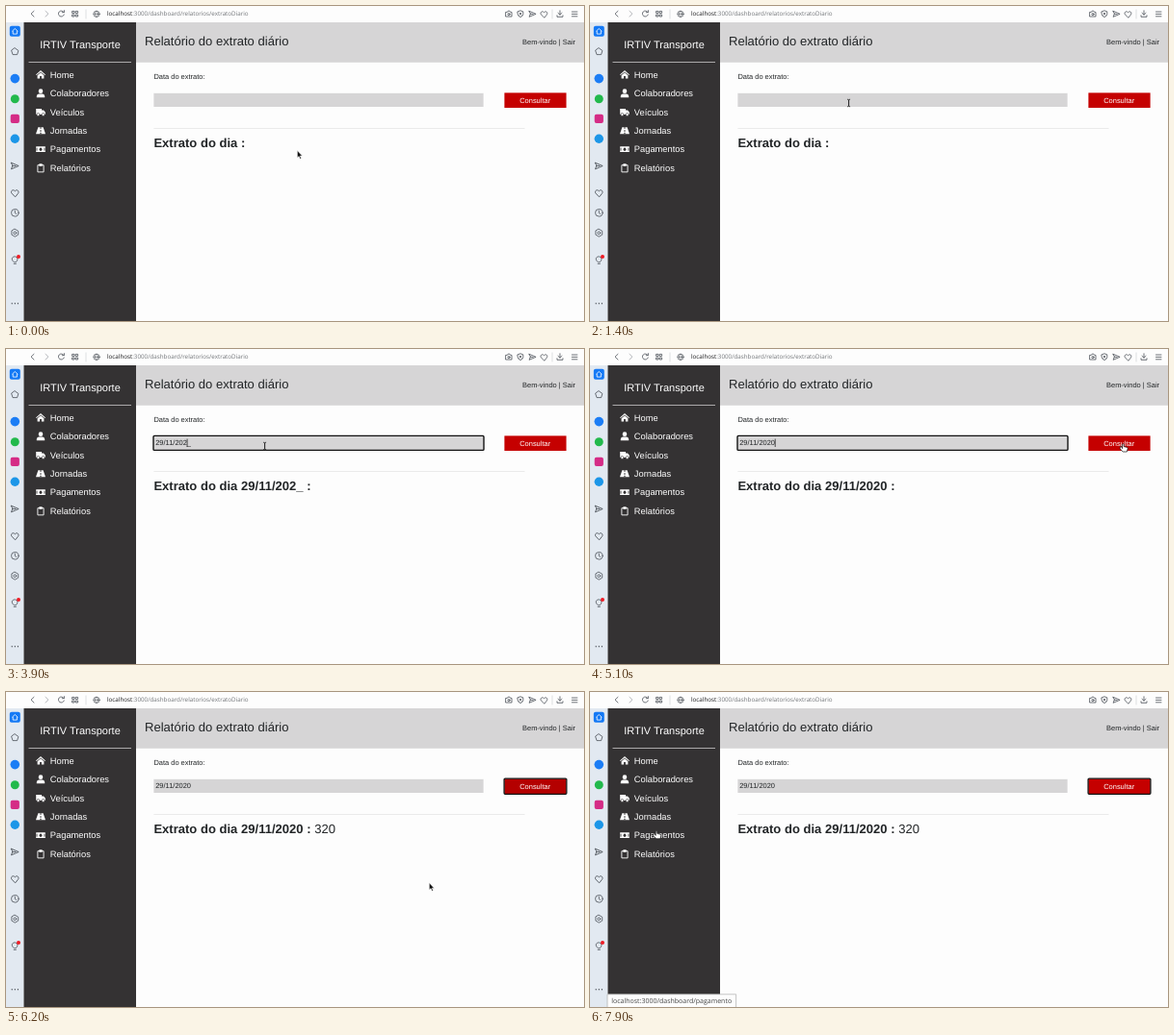
An HTML page that plays this animation: 600 px wide and 328 px high, repeating every 8000 ms.

```html
<!DOCTYPE html>
<html lang="pt">
<head>
<meta charset="utf-8">
<style>
  html, body { margin: 0; overflow: hidden; background: #fdfdfd; }
  svg { display: block; }
  text { font: 7.47px "Liberation Sans", Arial, sans-serif; fill: #222527; text-rendering: geometricPrecision; }
  .brand { font-size: 11px; fill: #fff; text-anchor: middle; }
  .title { font-size: 13.05px; }
  .menu text { font-size: 9.33px; fill: #fff; }
  .url { font: 6.25px "Open Sans", "Noto Sans", sans-serif; fill: #73767a; }
  .url tspan { fill: #1c1c1e; }
  .line { fill: none; stroke: #4b5057; stroke-width: .8; stroke-linecap: round; stroke-linejoin: round; }
  .bold { font-weight: bold; }
</style>
</head>
<body>
<svg width="600" height="328" viewBox="0 0 600 328">
  <defs>
    <path id="heart" d="M0 3.4L-3 .3C-4.6-1.6-1.9-4.3 0-1.8C1.9-4.3 4.6-1.6 3 .3Z"/>
    <path id="plane" d="M-3.4-3L3.6 0L-3.4 3L-2.2 0ZM-2.2 0H.6"/>
    <path id="house" d="M-5 0L0-4.4L5 0L4.3 .7L0-3L-4.3 .7ZM-3.4 .8L0-2.1L3.4 .8V4.2H.9V1.6H-.9V4.2H-3.4Z"/>
  </defs>

  <!-- browser toolbar -->
  <path fill="#fdfdfd" d="M0 0H600V17H0Z"/>
  <g class="line">
    <path d="M29 5.3L26 8.2L29 11.1"/>
    <path stroke="#a5a8ad" d="M41 5.3L44 8.2L41 11.1"/>
    <path d="M60 6.4A3 3 0 1 0 60.3 9M60.4 4.6V6.7H58.3"/>
    <path d="M69 5.4h2v2h-2zM72.6 5.4h2v2h-2zM69 9h2v2h-2zM72.6 9h2v2h-2z"/>
    <path stroke="#d5d7da" d="M83 4V13M567 4V13"/>
    <g stroke-width=".6"><circle cx="94" cy="8.3" r="3.2"/><ellipse cx="94" cy="8.3" rx="1.4" ry="3.2"/><path d="M90.8 8.3H97.2"/></g>
    <path d="M519 6.4h1.4l.7-1.2h1.8l.7 1.2H525V11h-6z"/><circle cx="522" cy="8.6" r="1.1"/>
    <path d="M531.2 5.8L534 4.8L536.8 5.8V8.6Q536.6 10.6 534 11.6Q531.4 10.6 531.2 8.6ZM533 7.1L535 9.1M535 7.1L533 9.1"/>
    <use href="#plane" x="546.5" y="8.3"/>
    <use href="#heart" x="558.5" y="8.6"/>
    <path d="M575 4.8V9M573 7.3L575 9.2L577 7.3M572 9.8V11.3H578V9.8"/>
    <path d="M587.5 6H593M587.5 8.4H593M587.5 10.8H593"/>
  </g>
  <text class="url" x="105" y="10.4"><tspan>localhost</tspan>:3000/dashboard/relatorios/extratoDiario</text>

  <!-- browser sidebar -->
  <path fill="#e2e9f1" d="M0 17H18.5V328H0Z"/>
  <rect x="3.8" y="20.8" width="11" height="11" rx="2" fill="#1479f5"/>
  <path d="M6.3 26.3L9.3 23.5L12.3 26.3M7.2 26V29.1H11.4V26" fill="none" stroke="#fff" stroke-width=".8"/>
  <circle cx="9.3" cy="75.6" r="4.8" fill="#1b7df5"/>
  <circle cx="9.3" cy="96.8" r="4.5" fill="#22b94c"/>
  <rect x="4.7" y="112.8" width="9.2" height="9.2" rx="2" fill="#d52c86"/>
  <circle cx="9.3" cy="138.2" r="4.7" fill="#1c96e8"/>
  <g class="line">
    <path d="M9.3 43.8L12.9 46.5L11.6 50.6H7L5.7 46.5Z"/>
    <use href="#plane" transform="translate(9.2 166.5) scale(1.1)"/>
    <use href="#heart" transform="translate(9.3 194.8) scale(1.1)"/>
    <circle cx="9.3" cy="215.3" r="3.8"/><path d="M9.3 213V215.5L10.8 216.5"/>
    <path d="M9.3 232.3L12.7 234.3V238.2L9.3 240.2L5.9 238.2V234.3Z"/><circle cx="9.3" cy="236.3" r="1.4"/>
    <path d="M8 266.5Q5.8 264.8 6.2 262.8Q7 260.8 9.3 260.8Q11.6 261.2 12 263.4Q12 265.2 10.6 266.5ZM8.2 268.4H10.4"/>
  </g>
  <circle cx="13" cy="261" r="2" fill="#ef1c25"/>
  <path d="M6.2 309.8h.01M9.3 309.8h.01M12.4 309.8h.01" stroke="#4b5057" stroke-width="1.4" stroke-linecap="round"/>

  <!-- app menu -->
  <path fill="#343233" d="M18.5 17H135V328H18.5Z"/>
  <path stroke="#c9c8c9" stroke-width=".8" d="M23.5 58.5H130"/>
  <text class="brand" x="77" y="44.1">IRTIV Transporte</text>
  <g class="menu" id="menu" fill="#fff"></g>

  <!-- page -->
  <path fill="#d6d5d6" d="M135 17H600V58.8H135Z"/>
  <text class="title" x="144" y="41">Relatório do extrato diário</text>
  <text x="536" y="40.4">Bem-vindo | Sair</text>
  <text x="153.4" y="75.8">Data do extrato:</text>
  <rect id="field" x="153.4" y="90.8" width="342.2" height="14.2" fill="#d6d5d6"/>
  <rect id="fieldRing" x="153" y="90.4" width="343" height="15" rx="1" fill="none" stroke="#101010" stroke-width="1.4"/>
  <text id="date" x="155.2" y="100.4"></text>
  <path id="caret" stroke="#111" stroke-width=".7" d="M0 93.6V102"/>
  <rect id="button" x="517.4" y="90.4" width="64.2" height="15.6"/>
  <rect id="buttonRing" x="517.1" y="90.1" width="64.8" height="16.2" rx="1" fill="none" stroke="#101010" stroke-width="1.3"/>
  <text x="533.2" y="100.8" style="fill:#fff">Consultar</text>
  <path stroke="#e6e6e6" stroke-width=".8" d="M153.4 127.5H538.5"/>
  <text class="title" x="153.4" y="147.4"><tspan class="bold" id="heading"></tspan><tspan id="total"></tspan></text>

  <g id="status">
    <path fill="#fdfdfd" stroke="#b5b5b5" stroke-width=".8" d="M18 314.8H151.6V329H18Z"/>
    <text x="22.2" y="323.8" class="url" style="font-size:7px;fill:#444">localhost:3000/dashboard/pagamento</text>
  </g>

  <g id="arrow"><path fill="#111" stroke="#fff" stroke-width=".5" d="M0 0V7.4L1.7 5.9L2.9 8.7L4.1 8.2L2.9 5.5H5.1Z"/></g>
  <g id="beam"><path fill="none" stroke="#222" stroke-width=".8" d="M-1.5-3.8Q0-3.8 0-3V3Q0 3.8-1.5 3.8M1.5-3.8Q0-3.8 0-3V3Q0 3.8 1.5 3.8"/></g>
  <g id="hand"><path fill="#fff" stroke="#111" stroke-width=".7" stroke-linejoin="round" d="M-.8 5V.6Q0-.5 .8 .6V3L4.2 3.8Q5 4 4.8 5L4 8.4H-.3L-3.2 5.2Q-3-.0-.8 5Z"/></g>
</svg>
<script>
const el = id => document.getElementById(id);
const show = (id, on) => el(id).style.display = on ? "" : "none";

const menu = [
  ["Home", '<use href="#house"/>'],
  ["Colaboradores", '<circle cy="-2.2" r="2.3"/><path d="M-4.2 4.4V3Q-3.8 .7-1.6 .7H1.6Q3.8 .7 4.2 3V4.4Z"/>'],
  ["Veículos", '<path d="M-4.8-3.4H1V-1.8H3L4.8 .2V2.6H-4.8Z"/><g stroke="#343233" stroke-width=".6"><circle cx="-2.6" cy="2.7" r="1.5"/><circle cx="2.6" cy="2.7" r="1.5"/></g>'],
  ["Jornadas", '<path d="M-2.6-3.5H2.6L5 3.5H-5Z"/><path stroke="#343233" stroke-width="1.2" d="M0-3.6V-1.9M0-.6V1.1M0 2.1V3.6"/>'],
  ["Pagamentos", '<rect x="-4.9" y="-2.9" width="9.8" height="5.8" rx=".5"/><ellipse rx="1.4" ry="1.8" fill="#343233"/><path stroke="#343233" stroke-width=".9" d="M-4-1.5V1.5M4-1.5V1.5"/>'],
  ["Relatórios", '<path fill="none" stroke="#fff" stroke-width=".9" d="M-3.1-3H3.1V4.2H-3.1Z"/><path d="M-1.6-4.4H1.6V-1.9H-1.6Z"/>']
];
el("menu").innerHTML = menu.map(([label, icon], i) =>
  `<g transform="translate(36 ${71.4 + i * 19.45})">${icon}<text x="9.8" y="3.2">${label}</text></g>`).join("");

const LOOP = 8000, FOCUS = 1900, CLICK = 5400, RESULT = 5600;
const MASK = "__/__/____";
const typing = [
  [FOCUS, ""], [2500, "2"], [2600, "29/"], [3000, "29/1"], [3100, "29/11/"],
  [3500, "29/11/2"], [3700, "29/11/20"], [3800, "29/11/202"], [4000, "29/11/2020"]
];
// time, x, y of the pointer
const path = [
  [0, 302.4, 150.6], [400, 298, 143], [900, 281, 117], [1400, 268.6, 101], [4300, 268.6, 101],
  [4500, 310, 104], [4900, 515, 103], [5100, 553.4, 98.6], [5500, 553, 100], [5800, 550, 106],
  [5900, 534, 148], [6000, 504, 198], [6100, 466, 200], [6400, 386, 196], [7200, 386, 196],
  [7300, 331, 188.6], [7600, 142, 157], [7700, 97, 150], [7800, 74, 145.5], [7900, 69, 144.4]
];

const ramp = (t, from, to) => Math.min(1, Math.max(0, (t - from) / (to - from)));

function pointerAt(t) {
  const i = Math.max(1, path.findIndex(p => p[0] >= t));
  const [a, b] = [path[i - 1], path[i]];
  const k = ramp(t, a[0], b[0]);
  return [a[1] + (b[1] - a[1]) * k, a[2] + (b[2] - a[2]) * k];
}

function draw(t) {
  const [x, y] = pointerAt(t);
  const overField = x > 153 && x < 496 && y > 90 && y < 106;
  const overButton = x > 517 && y > 90 && y < 107;
  const overLink = x < 105;
  const kind = overField ? "beam" : overButton || overLink ? "hand" : "arrow";
  for (const id of ["arrow", "beam", "hand"]) show(id, id === kind);
  el(kind).setAttribute("transform", `translate(${x} ${y})`);
  show("status", overLink);

  const [since, typed] = typing.filter(k => k[0] <= t).pop() || [0, ""];
  const value = t < FOCUS ? "" : typed + MASK.slice(typed.length);
  const focused = t >= FOCUS && t < CLICK;
  el("date").textContent = value;
  el("heading").textContent = `Extrato do dia ${value && value + " "}:`;
  el("total").textContent = t >= RESULT ? " 320" : "";
  show("fieldRing", focused);
  show("buttonRing", t >= CLICK);

  const caretOn = focused && Math.floor((t - since) / 500) % 2 === 0;
  show("caret", caretOn);
  if (caretOn) {
    const offset = typed ? el("date").getSubStringLength(0, typed.length) : 0;
    el("caret").setAttribute("transform", `translate(${155.4 + offset} 0)`);
  }

  const dark = ramp(t, 5100, 5500) - ramp(t, 5800, 6300);
  el("button").setAttribute("fill", `rgb(${197 - 83 * dark},0,0)`);
}

function tick(now) {
  draw(Math.floor(now % LOOP / 100) * 100);
  requestAnimationFrame(tick);
}
draw(0);
requestAnimationFrame(tick);
</script>
</body>
</html>
```
